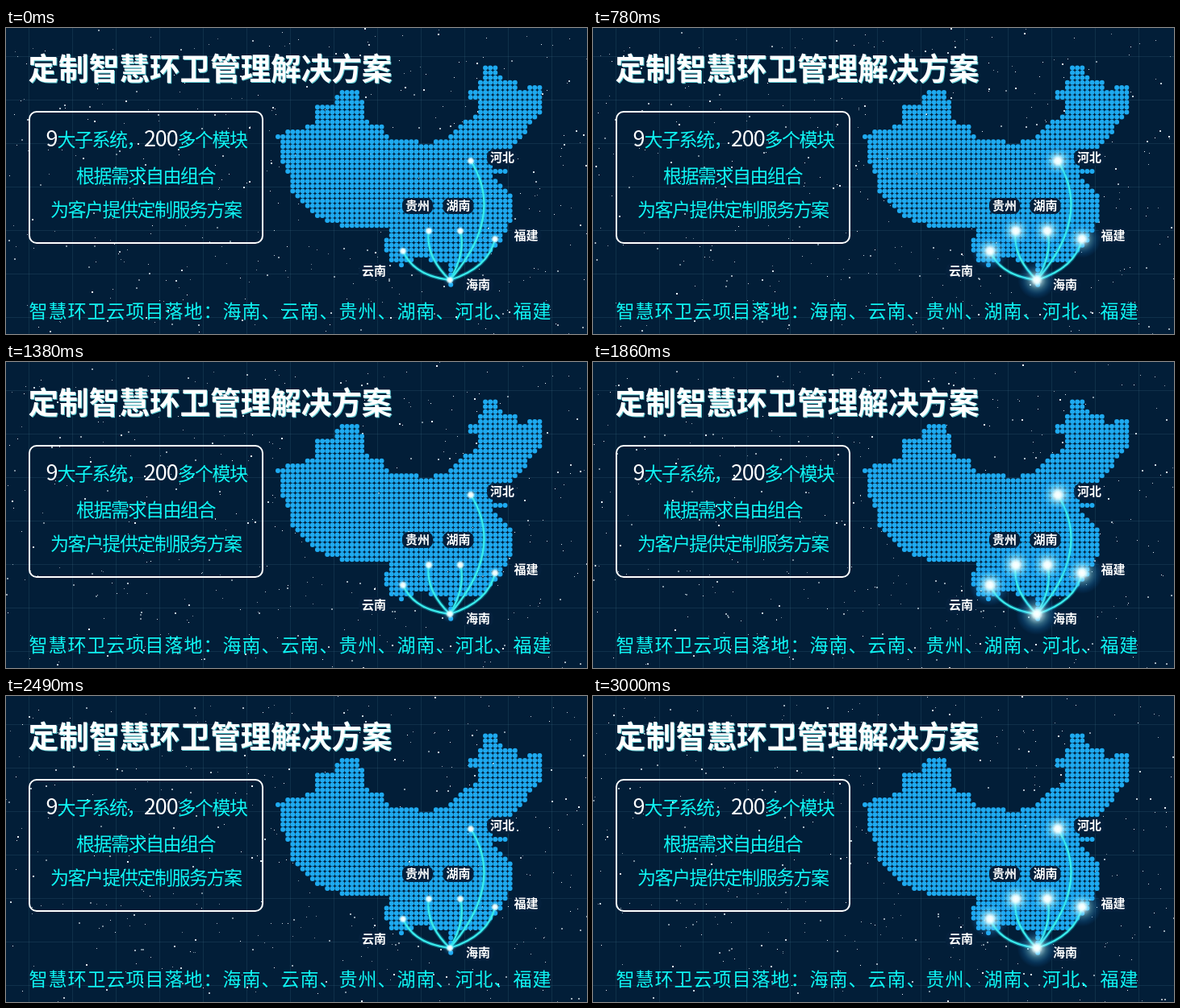
Recreate the animation shown at these times as an HTML page with a canvas. Size 720 px wide and 380 px high, loop 3030 ms.

```html
<!DOCTYPE html>
<html lang="zh-CN">
<head>
<meta charset="utf-8">
<title>智慧环卫</title>
<style>
  html, body { margin: 0; width: 100%; height: 100%; overflow: hidden; background: #021e38; }
  canvas, svg { position: absolute; left: 0; top: 0; width: 720px; height: 380px; display: block; }
  text { font-family: 'Noto Sans CJK SC', 'Noto Sans CJK', 'Noto Sans', sans-serif; fill: #0ff6f4; white-space: pre; }
  .title { font-size: 37.6px; font-weight: 700; fill: #fff; text-shadow: 1px 1px 0 #5cc9d0; }
  .body { font-size: 23px; letter-spacing: -1.5px; }
  .num { font-size: 27px; letter-spacing: -1.1px; font-weight: 500; fill: #fff; }
  .foot { font-size: 23px; letter-spacing: 1px; font-weight: 500; }
  .place { font-size: 15px; font-weight: 700; fill: #fff; }
  .plate { fill: #04203c; }
  .arc { fill: none; stroke: #3aeaea; stroke-width: 2.3; stroke-linecap: round; }
  .halo { fill: none; stroke: #19d8ee; stroke-width: 5; stroke-linecap: round; opacity: .3; }
</style>
</head>
<body>
<canvas id="sky" width="720" height="380"></canvas>
<svg viewBox="0 0 720 380">
  <defs>
    <radialGradient id="glow">
      <stop offset="0" stop-color="#fff"/>
      <stop offset=".22" stop-color="#e0fbff" stop-opacity=".75"/>
      <stop offset=".48" stop-color="#86e4ff" stop-opacity=".36"/>
      <stop offset=".75" stop-color="#26a4ff" stop-opacity=".16"/>
      <stop offset="1" stop-color="#128cff" stop-opacity="0"/>
    </radialGradient>
    <radialGradient id="core">
      <stop offset="0" stop-color="#fff"/>
      <stop offset=".5" stop-color="#f0ffff" stop-opacity=".85"/>
      <stop offset="1" stop-color="#bff6ff" stop-opacity="0"/>
    </radialGradient>
  </defs>

  <path id="map" fill="#1eaaf0"/>
  <g id="places"></g>
  <g id="arcs"></g>
  <g id="lights"></g>

  <text class="title" x="27.5" y="64">定制智慧环卫管理解决方案</text>
  <rect x="29" y="104" width="289" height="163" rx="9" fill="none" stroke="#fff" stroke-width="2"/>
  <text class="body" x="49.5" y="147"><tspan class="num">9</tspan>大子系统，<tspan class="num">200</tspan>多个模块</text>
  <text class="body" x="87" y="192">根据需求自由组合</text>
  <text class="body" x="55" y="234">为客户提供定制服务方案</text>
  <text class="foot" x="28.5" y="360">智慧环卫云项目落地：海南、云南、贵州、湖南、河北、福建</text>
</svg>
<script>
const W = 720, H = 380, LOOP = 3030, STEP = 30, PULSE = 1250;
const $ = id => document.getElementById(id);
const ctx = $('sky').getContext('2d');

function add(parent, tag, attrs, text) {
  const el = document.createElementNS('http://www.w3.org/2000/svg', tag);
  for (const key in attrs) el.setAttribute(key, attrs[key]);
  if (text) el.textContent = text;
  return parent.appendChild(el);
}

function random(seed) {
  return () => (seed = (seed * 16807) % 2147483647) / 2147483647;
}

// Map: a square lattice of dots kept where it falls inside a rough outline
const outline = new Path2D(`M591 46H609L614 60 632 68 634 77H649V72H665V98L657 114 631 143
  610 158 606 172H622V181L606 184 628 212V235L612 266 586 290 555 295V319H546V294L512 286
  488 295 475 288 469 268 474 258 470 246 425 250 388 235 354 207V188L340 161 342 146 333 130
  364 128 382 118 383 98 403 94 418 78H434L445 97 446 115 466 123 476 137 526 143 550 134
  585 103V91H572V80L585 78Z`);
const PITCH = 6.12;
let dots = '';
for (let y = 49.4; y < 322; y += PITCH)
  for (let x = 337; x < 668; x += PITCH)
    if (ctx.isPointInPath(outline, x, y)) dots += `M${x - 3} ${y}a3 3 0 1 1 6 0a3 3 0 1 1 -6 0`;
$('map').setAttribute('d', dots);

// Each light is tied to the hub by an arc; bow is its sideways swell per unit length
const hub = { x: 550, y: 313 };
const places = [
  { name: '海南', label: [570, 324], ...hub },
  { name: '云南', label: [441, 307], x: 492, y: 277, bow: .28 },
  { name: '贵州', label: [495, 226], x: 524, y: 252, bow: .25 },
  { name: '湖南', label: [545.5, 226], x: 563, y: 252, bow: -.2 },
  { name: '河北', label: [600, 166], x: 576, y: 165, bow: -.36 },
  { name: '福建', label: [629.5, 263], x: 606, y: 262, bow: -.28 }
];

function arc({ x, y, bow }) {
  const dx = hub.x - x, dy = hub.y - y;
  return `M${x} ${y}Q${x + .4 * dx - bow * dy} ${y + .4 * dy + bow * dx} ${hub.x} ${hub.y}`;
}

const lights = places.map(p => {
  const [lx, ly] = p.label;
  add($('places'), 'rect', { class: 'plate', x: lx - 4, y: ly - 15, width: 38, height: 20, rx: 8 });
  add($('places'), 'text', { class: 'place', x: lx, y: ly }, p.name);
  if (p.bow) for (const kind of ['halo', 'arc']) add($('arcs'), 'path', { class: kind, d: arc(p) });
  const light = id => add($('lights'), 'circle', { cx: p.x, cy: p.y, fill: `url(#${id})` });
  return { glow: light('glow'), core: light('core') };
});

// Sky: faint grid and slowly drifting specks
const rnd = random(4711);
const stars = Array.from({ length: 430 }, () => ({
  x: rnd() * W, y: rnd() * H,
  vx: (rnd() - .5) * 16, vy: (rnd() - .5) * 12,
  size: rnd() < .3 ? 2 : 1,
  alpha: .45 + rnd() * .55
}));
const wrap = (v, n) => Math.floor(((v % n) + n) % n);

function drawSky(s) {
  ctx.globalAlpha = 1;
  ctx.fillStyle = '#021e38';
  ctx.fillRect(0, 0, W, H);
  ctx.fillStyle = 'rgba(72, 122, 146, .2)';
  for (let x = 28; x < W; x += 54) ctx.fillRect(x, 0, 1, H);
  for (let y = 35; y < H; y += 54) ctx.fillRect(0, y, W, 1);
  ctx.fillStyle = '#eefaff';
  for (const p of stars) {
    ctx.globalAlpha = p.alpha;
    ctx.fillRect(wrap(p.x + p.vx * s, W), wrap(p.y + p.vy * s, H), p.size, p.size);
  }
}

function drawLights(t) {
  const k = (1 - Math.cos(2 * Math.PI * t / PULSE)) / 2;
  for (const { glow, core } of lights) {
    glow.setAttribute('r', 9 + 17 * k);
    glow.setAttribute('opacity', .55 + .45 * k);
    core.setAttribute('r', 5 + 2.5 * k);
  }
}

function frame(now) {
  const t = Math.floor((now % LOOP) / STEP) * STEP;
  drawSky(t / 1000);
  drawLights(t);
  requestAnimationFrame(frame);
}
frame(0);
</script>
</body>
</html>
```
